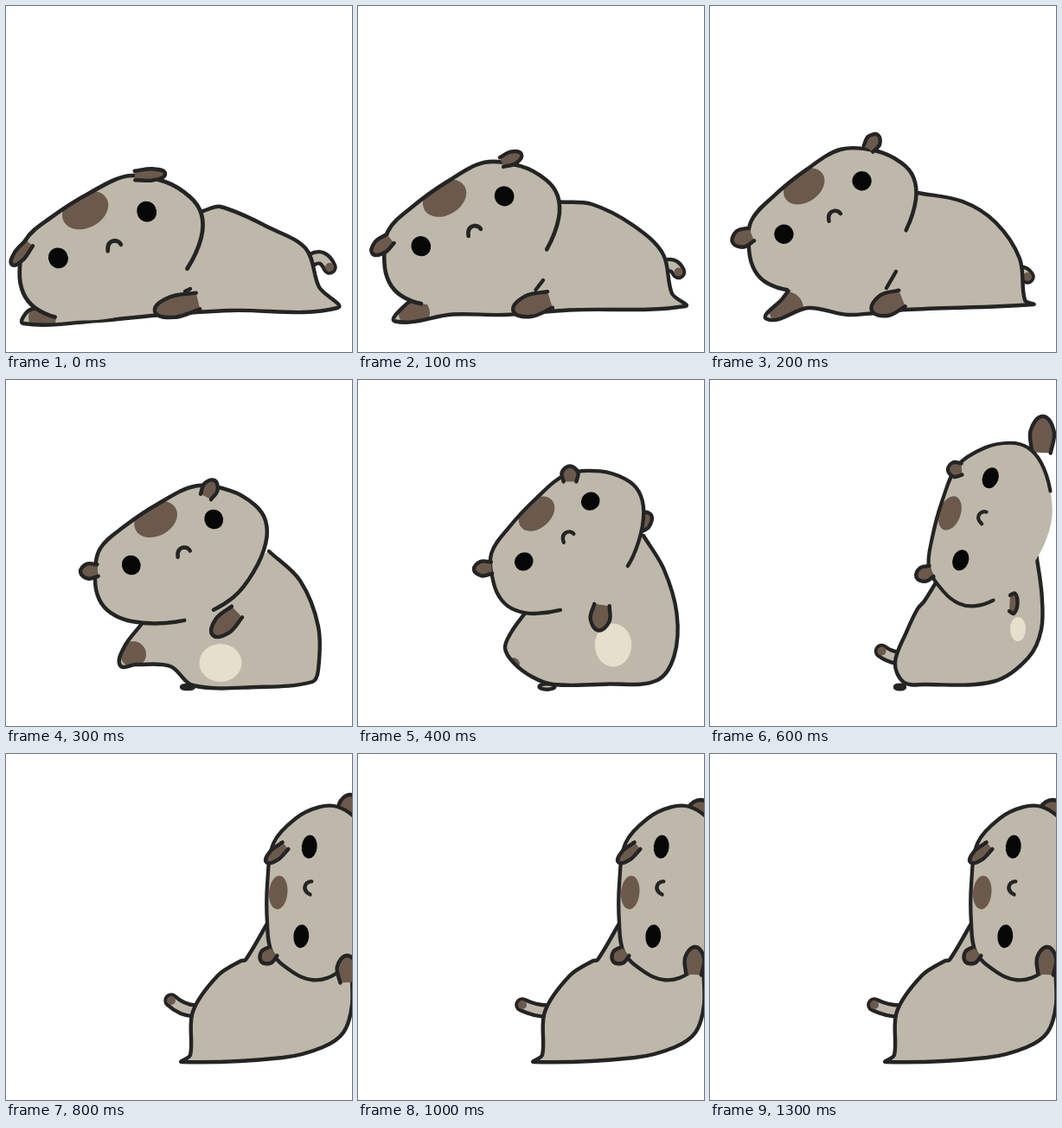
An HTML page for the animation above (1.4 s loop, 400 by 400 pixels).

```html
<!DOCTYPE html>
<html lang="en">
<head>
<meta charset="utf-8">
<title>Rolling pet</title>
<style>
  html, body { margin: 0; width: 100%; height: 100%; overflow: hidden; background: #fff; }
  svg { display: block; width: 100%; height: 100%; }
  path { fill: none; }
  .ink { stroke: #242424; stroke-width: 4.4; }
  .fur { fill: #beb8aa; }
  .brown { fill: #6b5a4c; }
  .eye { fill: #070707; }
</style>
</head>
<body>
<svg viewBox="0 0 400 400" stroke-linecap="round" stroke-linejoin="round">
  <clipPath id="inHead"><path class="headShape"/></clipPath>
  <clipPath id="inBody"><path class="bodyShape"/></clipPath>

  <path id="upper" class="ink brown"/>
  <path class="tailShape" stroke="#242424" stroke-width="17.5"/>
  <path class="tailShape" stroke="#beb8aa" stroke-width="9"/>
  <circle id="tailTip" class="brown" r="5"/>

  <path class="bodyShape fur"/>
  <circle id="leftPaw" class="brown" clip-path="url(#inBody)"/>
  <path class="bodyShape ink"/>
  <ellipse id="foot" class="ink" fill="#cfc3b2"/>
  <ellipse id="belly" fill="#e6dfcc"/>

  <g id="head">
    <path class="headShape fur"/>
    <g clip-path="url(#inHead)"><ellipse id="spot" class="brown" cx="-4" cy="-32"/></g>
    <path id="headLine" class="headShape ink" pathLength="100"/>
    <ellipse class="eye" cx="-53.5"/>
    <ellipse class="eye" cx="53.5"/>
    <path id="mouth" class="ink" d="M-7 6Q-8-4 0-5Q5-5 7-1"/>
  </g>
  <path id="earL" class="ink brown"/>
  <path id="earR" class="ink brown"/>
  <path id="lower" class="ink brown"/>
  <path id="arm" class="ink"/>
</svg>
<script>
const STEP = 100;

// One head for every pose, centred between the eyes, starting at the chin
const HEAD = [-14, 88, 30, 88, 64, 74, 92, 52, 104, 30, 102, 8, 86, -19, 54, -43, 8, -46,
  -40, -42, -76, -33, -97, -6, -104, 16, -100, 36, -84, 56, -52, 76];

// head: x, y, tilt, size, hidden chin; limbs: base, tip, width; tail: base, bend, tip
const flat = {
  head: [111.5, 264.5, -27.7, 1.08, 14.6],
  body: [228, 237, 248, 232, 306, 257, 347, 281, 362, 325, 383, 349,
    260, 352, 180, 357, 105, 364, 20, 367, 28, 351, 52, 350],
  earL: [27, 274, 7, 299, 13], earR: [149, 196, 184, 194, 13],
  lower: [222, 341, 172, 353, 24], arm: [213, 327, 207, 330],
  tail: [354, 293, 367, 286, 374, 302], leftPaw: [42, 360, 16]
};
const rise = {
  head: [130.5, 233, -34.3, 1.02, 14.6],
  body: [240, 216, 292, 226, 330, 250, 358, 292, 364, 340, 374, 345,
    228, 351, 160, 357, 114, 349, 66, 362, 84, 338, 99, 318],
  earL: [48, 264, 26, 273, 20], earR: [183, 165, 194, 149, 16],
  lower: [222, 338, 187, 352, 25], arm: [215, 307, 204, 326],
  tail: [358, 308, 364, 308, 367, 313], leftPaw: [88, 350, 20]
};
const lean = {
  head: [192.5, 187.5, -29, 1.02, 3.2],
  body: [304, 198, 340, 232, 361, 285, 361, 335, 354, 349, 290, 355,
    216, 353, 190, 331, 150, 329, 132, 330, 137, 308, 156, 283],
  earL: [106, 220, 86, 222, 17], earR: [231, 135, 241, 116, 17],
  upper: [285, 185, 298, 175, 14], lower: [267, 268, 239, 295, 22],
  tail: [225, 340, 225, 340, 225, 340], leftPaw: [147, 317, 15],
  belly: [248, 327, 24.5, 22], foot: [210, 355, 7, 2]
};
const sit = {
  head: [268, 162.5, -55.3, 0.92, 14.6],
  body: [356, 162, 367, 205, 376, 255, 370, 303, 336, 346, 290, 348,
    235, 351, 212, 355, 210, 325, 208, 290, 218, 274, 230, 256],
  earL: [203, 214, 182, 216, 16], earR: [259, 100, 249, 83, 20],
  upper: [351, 157, 379, 136, 26], lower: [297, 252, 317, 284, 22],
  tail: [214, 345, 210, 343, 206, 342], leftPaw: [212, 340, 0],
  belly: [342, 286, 18, 28], foot: [227, 354, 11, 4.5]
};
const hug = {
  head: [346, 159, -84.8, 0.97, 14.6],
  body: [399, 245, 400, 290, 390, 322, 366, 339, 320, 351, 203, 356,
    213, 348, 216, 298, 245, 256, 272, 239, 277, 238, 302, 196],
  earL: [309, 228, 295, 240, 17], earR: [323, 106, 301, 125, 13],
  upper: [398, 74, 398, 47, 26], lower: [396, 264, 394, 233, 24],
  tail: [218, 297, 203, 296, 191, 285], leftPaw: [212, 340, 0],
  belly: [370, 290, 0, 0], foot: [212, 356, 0, 0]
};
const settle = {
  ...hug,
  upper: [396, 74, 396, 53, 27], lower: [388, 255, 390, 223, 22],
  tail: [218, 297, 205, 297, 190, 290]
};

function mix(a, b, t) {
  const out = {};
  for (const k in a) out[k] = a[k].map((v, i) => v + (b[k][i] - v) * t);
  return out;
}

const reach = { ...mix(sit, hug, 0.5), upper: [383, 84, 385, 42, 27] };
const poses = [flat, mix(flat, rise, 0.5), rise, lean, mix(lean, sit, 0.5), sit, reach];
// Paws and tail keep twitching while the body holds still
for (let i = 0; i < 7; i++) poses.push(mix(hug, settle, (i + 2) % 3 / 2));

// Smooth curve through x,y pairs; handles scale with each span
function curve(p, closed) {
  const n = p.length / 2;
  const at = i => {
    const j = 2 * (closed ? (i + n) % n : Math.max(0, Math.min(n - 1, i)));
    return [p[j], p[j + 1]];
  };
  const handle = (from, to, length) => {
    const dx = to[0] - from[0], dy = to[1] - from[1], k = length / 3 / (Math.hypot(dx, dy) || 1);
    return [dx * k, dy * k];
  };
  let d = 'M' + at(0);
  for (let i = 0; i < (closed ? n : n - 1); i++) {
    const [a, b, c, e] = [-1, 0, 1, 2].map(k => at(i + k));
    const span = Math.hypot(c[0] - b[0], c[1] - b[1]);
    const h1 = handle(a, c, span), h2 = handle(b, e, span);
    d += 'C' + [b[0] + h1[0], b[1] + h1[1], c[0] - h2[0], c[1] - h2[1], ...c];
  }
  return d;
}

// Rounded lobe, open at its base
function limb([x0, y0, x1, y1, width]) {
  const dx = x1 - x0, dy = y1 - y0, k = width / (Math.hypot(dx, dy) || 1);
  const profile = [[0, 0.4], [0.6, 0.5], [1, 0], [0.6, -0.5], [0, -0.4]];
  return curve(profile.flatMap(([t, s]) => [x0 + dx * t - dy * k * s, y0 + dy * t + dx * k * s]));
}

function set(target, attrs) {
  const list = typeof target === 'string' ? document.querySelectorAll(target) : [target];
  for (const el of list) for (const k in attrs) el.setAttribute(k, attrs[k]);
}

function oval(id, [cx, cy, rx, ry] = [0, 0, 0, 0]) {
  set(id, { cx, cy, rx, ry, visibility: rx > 0 ? 'visible' : 'hidden' });
}

function drawHead([x, y, tilt, size, gap]) {
  const turn = (-tilt - 28) / 57;
  set('#head', { transform: `translate(${x} ${y}) rotate(${tilt}) scale(${size})` });
  set('#headLine', { 'stroke-dasharray': `${100 - 2 * gap} 100`, 'stroke-dashoffset': -gap });
  set('#spot', { rx: 26 - 6 * turn, ry: 19 - 8 * turn });
  set('.eye', { rx: 10.5 + 3.5 * turn, ry: 11.2 - 2 * turn });
  set('#mouth', { transform: `translate(6 ${16 - 12 * turn}) rotate(28)` });
}

function draw(time) {
  const pose = poses[Math.floor(time / STEP) % poses.length];
  const [bx, by, cx, cy, tx, ty] = pose.tail;
  const [px, py, r] = pose.leftPaw;
  set('.tailShape', { d: `M${bx} ${by}Q${cx} ${cy} ${tx} ${ty}` });
  set('#tailTip', { cx: tx, cy: ty });
  set('.bodyShape', { d: curve(pose.body) });
  set('#leftPaw', { cx: px, cy: py, r });
  oval('#foot', pose.foot);
  oval('#belly', pose.belly);
  drawHead(pose.head);
  for (const id of ['upper', 'lower', 'earL', 'earR']) {
    set('#' + id, { d: pose[id] ? limb(pose[id]) : '' });
  }
  set('#arm', { d: pose.arm ? curve(pose.arm) : '' });
}

set('.headShape', { d: curve(HEAD, true) + 'Z' });
const start = performance.now();
function tick() {
  draw(performance.now() - start);
  requestAnimationFrame(tick);
}
tick();
</script>
</body>
</html>
```
